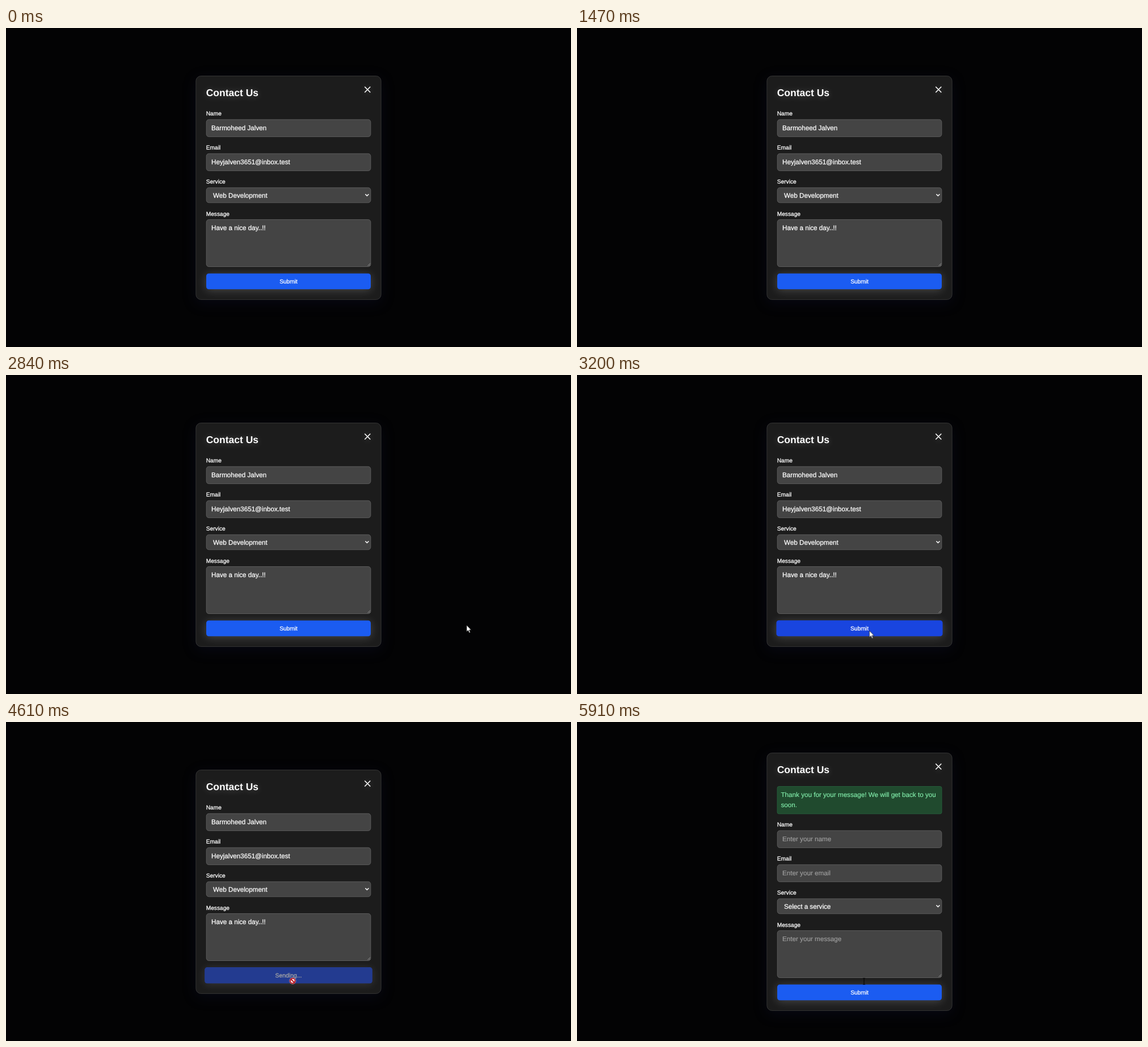
Write an HTML page that moves like this. It is 996x562 px and loops after 5.94 s.

```html
<!DOCTYPE html>
<html lang="en">
<head>
<meta charset="utf-8">
<title>Contact form</title>
<style>
  html, body { margin: 0; width: 100%; height: 100%; overflow: hidden; background: #030304; }
  svg { display: block; width: 996px; height: 562px; }
  text {
    font: 11.67px "Liberation Sans", Arial, sans-serif;
    color: #fff;
    fill: currentColor;
    stroke: currentColor;
    stroke-width: .28;
    text-rendering: geometricPrecision;
    white-space: pre;
  }
  .title { font-size: 17.5px; font-weight: 700; stroke: none; }
  .label, .caption { font-size: 10.2px; }
  .caption { text-anchor: middle; }
  .hint { color: #a0a0a0; stroke-width: .15; }
  .card { fill: #1c1c1c; stroke: #353535; filter: drop-shadow(0 6px 12px rgba(31, 38, 100, .16)); }
  .field { fill: #444; stroke: #666; stroke-width: .8; }
  .line { fill: none; stroke: #fff; stroke-width: 1.6; }
  .grip { fill: none; stroke: #b5b5b5; stroke-width: .7; }
  .glow { filter: drop-shadow(0 1px 6px rgba(255, 255, 255, .2)); }
  .notice rect { fill: #204a2e; stroke: #286640; stroke-width: .8; }
  .notice text { color: #84f0ad; stroke-width: .15; }

  /* one shared timeline of 5940 ms */
  .before, .after, .head, .form, .ready, .sending, .arrow, .blocked,
  .notice, .button, .face, .pointer { animation: 5940ms linear infinite; }

  .before { animation-name: before; animation-timing-function: step-end; }
  .after { animation-name: after; animation-timing-function: step-end; }
  .head { animation-name: head; animation-timing-function: step-end; }
  .form { animation-name: form; animation-timing-function: step-end; }
  .ready { animation-name: ready; animation-timing-function: step-end; }
  .sending, .blocked { animation-name: sending; animation-timing-function: step-end; }
  .arrow { animation-name: arrow; animation-timing-function: step-end; }
  .notice { animation-name: notice; }
  .button { animation-name: hover, dim; transform-origin: 498px 446.3px; }
  .face { animation-name: tint; filter: drop-shadow(0 2px 8px rgba(255, 255, 255, .2)); }
  .pointer { animation-name: travel; }

  @keyframes before { 0% { visibility: visible } 87.96%, 100% { visibility: hidden } }
  @keyframes after { 0% { visibility: hidden } 87.96%, 100% { visibility: visible } }
  @keyframes head { 0% { transform: none } 87.96%, 100% { transform: translateY(-30px) } }
  @keyframes form { 0% { transform: none } 87.96%, 100% { transform: translateY(30px) } }
  @keyframes ready {
    0% { visibility: visible }
    65.66% { visibility: hidden }
    87.96%, 100% { visibility: visible }
  }
  @keyframes sending {
    0% { visibility: hidden }
    65.66% { visibility: visible }
    87.96%, 100% { visibility: hidden }
  }
  @keyframes arrow {
    0% { visibility: hidden }
    43.77% { visibility: visible }
    65.66%, 100% { visibility: hidden }
  }
  @keyframes notice {
    0%, 88.3% { opacity: 0; transform: translateY(-7px); animation-timing-function: ease-out }
    93.27%, 100% { opacity: 1; transform: none }
  }
  @keyframes hover {
    0% { transform: none }
    52.3% { transform: none; animation-timing-function: ease }
    57.35% { transform: scale(1.02) }
    88.3% { transform: scale(1.02); animation-timing-function: ease }
    92.59%, 100% { transform: none }
  }
  @keyframes dim {
    0% { opacity: 1; animation-timing-function: step-end }
    65.66% { opacity: .6; animation-timing-function: step-end }
    87.96%, 100% { opacity: 1 }
  }
  @keyframes tint {
    0%, 52.3% { fill: #1b5cf1 }
    54.2%, 65.65% { fill: #1941db }
    65.66% { fill: #2850de; animation-timing-function: step-end }
    87.96%, 100% { fill: #1b5cf1 }
  }
  @keyframes travel {
    0%, 43.77% { transform: translate(1000px, 385px) }
    47.14% { transform: translate(840px, 438px) }
    51.68% { transform: translate(655px, 456px) }
    53.87% { transform: translate(515.5px, 450.5px) }
    57.24%, 65.66% { transform: translate(504.5px, 455.2px) }
    87.96%, 100% { transform: translate(506px, 456.8px) }
  }
</style>
</head>
<body>
<svg viewBox="0 0 996 562">
  <rect class="card before" x="334.9" y="84.6" width="326.2" height="393.8" rx="8.7"/>
  <rect class="card after" x="334.9" y="54.6" width="326.2" height="453.8" rx="8.7"/>

  <g class="head">
    <g class="glow">
      <text class="title" x="352.7" y="120">Contact Us</text>
      <path class="line" d="M632.3 103.5l10 10m0-10l-10 10"/>
    </g>
  </g>

  <g class="notice">
    <rect x="353" y="113.5" width="290" height="48.3" rx="3"/>
    <text x="359.5" y="132.4">Thank you for your message! We will get back to you</text>
    <text x="359.5" y="150">soon.</text>
  </g>

  <g class="form">
    <text class="label" x="352.7" y="154.3">Name</text>
    <rect class="field" x="353.2" y="161.3" width="289.7" height="30.3" rx="4.5"/>
    <text class="label" x="352.7" y="214.3">Email</text>
    <rect class="field" x="353.2" y="221.3" width="289.7" height="30.3" rx="4.5"/>
    <text class="label" x="352.7" y="274.3">Service</text>
    <rect class="field" x="353.2" y="281.3" width="289.7" height="26.5" rx="4.5"/>
    <path class="line" d="M633.4 292.7l3 3 3-3"/>
    <text class="label" x="352.7" y="330.8">Message</text>
    <rect class="field" x="353.2" y="337.5" width="289.7" height="83" rx="4.5"/>
    <path class="grip" d="M637.5 419.2l4.6-4.6m-1.8 4.6l1.8-1.8"/>

    <g class="before">
      <text x="362" y="180">Barmoheed Jalven</text>
      <text x="362" y="240">Heyjalven3651@inbox.test</text>
      <text x="365" y="298.5">Web Development</text>
      <text x="362" y="356.2">Have a nice day..!!</text>
    </g>
    <g class="after">
      <text class="hint" x="362" y="180">Enter your name</text>
      <text class="hint" x="362" y="240">Enter your email</text>
      <text x="365" y="298.5">Select a service</text>
      <text class="hint" x="362" y="356.2">Enter your message</text>
    </g>

    <g class="button">
      <rect class="face" x="353" y="432.4" width="290" height="27.8" rx="4.4"/>
      <text class="caption ready" x="498" y="450">Submit</text>
      <text class="caption sending" x="498" y="450">Sending...</text>
    </g>
  </g>

  <g class="pointer">
    <path class="arrow" d="M0 0v11.6l2.7-2.5 1.9 4.4 1.9-.8-1.9-4.3h3.6z" fill="#fff" stroke="#111" stroke-width=".7"/>
    <g class="blocked">
      <circle r="5.7" fill="#fff"/>
      <circle r="4.4" fill="#fff" stroke="#b80d18" stroke-width="2"/>
      <path d="M-3.2-3.2l6.4 6.4" stroke="#b80d18" stroke-width="2"/>
    </g>
    <path class="after" d="M-2-5.5h1.5l.5.5.5-.5h1.5M0-5v10M-2 5.5h1.5l.5-.5.5.5h1.5" fill="none" stroke="#000"/>
  </g>
</svg>
</body>
</html>
```
